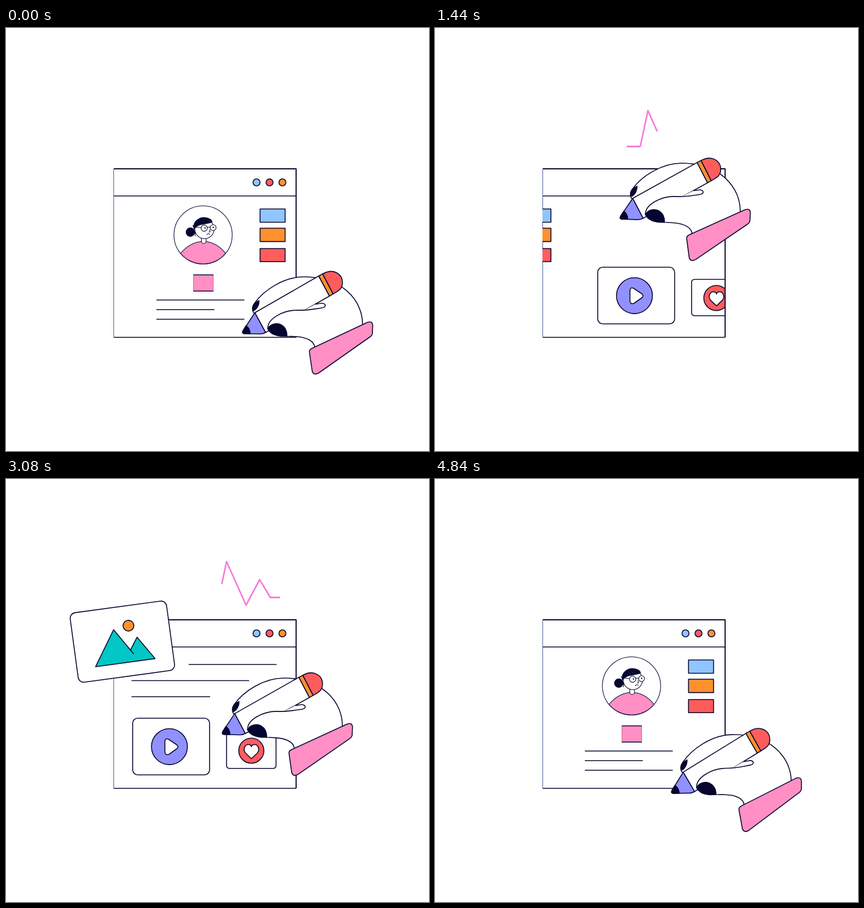
An HTML page for the animation above (4880 ms loop, 748 by 748 pixels).

```html
<!DOCTYPE html>
<html lang="en">
<head>
<meta charset="utf-8">
<title>Page design</title>
<style>
html, body { margin: 0; width: 100%; height: 100%; overflow: hidden; background: #fff; }
svg { display: block; width: 100%; height: 100%; }
.ink { stroke: #05052f; stroke-width: 1.6; fill: none; stroke-linejoin: round; }
.thin { stroke-width: 1.1; }
.bold { stroke-width: 1.9; }
.edge { stroke: #4b5694; stroke-width: 1; }
.bare { stroke: none; }
.white { fill: #fff; }
.pink { fill: #ff8fc4; }
.blue { fill: #90c5ff; }
.orange { fill: #ff912d; }
.red { fill: #ff5c5c; }
.purple { fill: #9190ff; }
.teal { fill: #03c6c6; }
.dark { fill: #05052f; }
.doodle { fill: none; stroke-width: 2.8; stroke-linejoin: round; }
</style>
</head>
<body>
<svg viewBox="0 0 748 748">
  <clipPath id="pane"><rect x="190" y="298" width="322" height="248.5"/></clipPath>

  <g class="ink">
    <path d="M190.5 297H513M190.5 547H513"/>
    <path class="bold" d="M190.5 249H513V547"/>
    <path class="edge" d="M190.5 249V547"/>
    <circle class="blue" cx="443" cy="273" r="6.2"/>
    <circle class="red" cx="466" cy="273" r="6.2"/>
    <circle class="orange" cx="488.8" cy="273" r="6.2"/>
  </g>

  <g clip-path="url(#pane)">
    <g id="board" class="ink">
      <path id="line0"/><path id="line1"/><path id="line2"/>
      <rect class="white" x="224" y="423" width="136" height="100.3" rx="9"/>
      <circle class="purple" cx="289" cy="473.3" r="31.8"/>
      <path class="white" d="M281 465q0-7 6-5L302 470q4 3.5 0 7L288 487q-7 2-7-5Z"/>
      <g id="like">
        <rect class="white" x="390" y="427" width="87.5" height="64.3" rx="5"/>
        <circle class="red" cx="433.8" cy="460" r="22.2"/>
        <path class="white" d="M434 474L423.5 464C418 457 423 449 428.5 449C431.5 449 434 451 434 453C434 451 436.5 449 439.5 449C445 449 450 457 444.5 464Z"/>
      </g>
    </g>
    <g id="profile" class="ink">
      <g class="thin">
        <circle class="white" cx="348.5" cy="366" r="51.5"/>
        <path class="pink" d="M308.7 398.5C321 384 335 377.5 349 377.5S377 384 388.3 398.5A51.5 51.5 0 0 1 308.7 398.5Z"/>
        <path class="white" d="M345.5 369V378.5Q349.5 384 353.8 378.5V369Z"/>
        <circle class="white" cx="351" cy="355.5" r="17"/>
        <circle class="dark" cx="326" cy="361" r="7.6"/>
        <path class="dark" d="M332.5 356C329 343 341 335 350 335C358 335 364 339 364.5 343C354 348 339 345 332.5 356Z"/>
        <circle class="white" cx="350.5" cy="354" r="5.6"/>
        <circle class="white" cx="366.3" cy="353" r="5.2"/>
        <path d="M356 353q2.5-2 5 0M345 353L335 352M360 356l1 4.5-2.5 .5M355 366q2.5-4 5.5-1M330 349l3 5M334.5 361v7"/>
        <circle class="dark bare" cx="352" cy="353.5" r="1.2"/>
        <circle class="dark bare" cx="366.5" cy="352.5" r="1.2"/>
      </g>
      <rect class="blue" x="449.3" y="320" width="44.3" height="23.5"/>
      <rect class="orange" x="449.3" y="354" width="44.3" height="23.6"/>
      <rect class="red" x="449.3" y="390" width="44.3" height="23.3"/>
      <rect id="button" class="pink" x="-86.3" y="436.5" width="172.6" height="28.7"/>
      <path d="M266 481H421.5M266 498H368.5M266 515H421.5"/>
    </g>
  </g>

  <g id="photo" class="ink">
    <rect class="white" x="-86" y="-62" width="172" height="124" rx="10"/>
    <path class="teal" d="M-53 37.7L-12.5-23L16.5 23.5L12.2 16.6L26.8-4.3L53.3 37.5Z"/>
    <circle class="orange" cx="14.4" cy="-26.5" r="9.5"/>
  </g>

  <path id="zigzag" class="doodle" stroke="#f67ddb" pathLength="100" d="M342 209.5H366L379.5 146L414 223L438 178L457 209.5H474"/>
  <path id="squiggle" class="doodle" stroke="#12aebf" pathLength="100" d="M112 541C120 556 134 556 141 554C149 552 155 546 150 540C145 536 134 541 135 551C137 567 154 580 170 576C180 573 185 568 181 564C175 560 164 567 166 578C170 598 195 602 210 590"/>

  <g id="hand" class="ink">
    <path class="white" d="M437 502C435 497 436 491 440 486C455 465 490 440 527 440C595 440 631 482 630.5 525L546 566C546 553 530 546.5 513 545.7L497 545L463 533Z"/>
    <path class="dark" d="M436.5 499C435 491 439 486 447.5 482C448 489 444 497 438 500Z"/>
    <path class="white" d="M440 503.5L553 438.5L572 474L459 538.5Z"/>
    <path class="purple" d="M440 503.5L459 538.5Q455 541 449 541L421 540.5Q417 540 419 535.5Z"/>
    <path class="dark" d="M424.5 526.5Q431 530 432 540.7L421 540.5Q417 540 419 535.5Z"/>
    <path class="orange" d="M553 438.5L560 434.8L578.5 470.3L572 474Z"/>
    <path class="red" d="M560 434.8C579 424 595 435 595 450C595 460 590 464 578.5 470.3Z"/>
    <path class="white bare" d="M463 533C461 514 490 499 515 499C532 499 545 497 558 495L570 530L497 545Z"/>
    <path class="white" d="M463 533C461 514 490 499 515 499C532 500 545 497 558 495Q565 494 564.5 490Q563 486 556 487L547 488.5"/>
    <path class="dark" d="M463 531.5C468 522 480 521 487 525C494 529 497 536 497 545L487 545C475 544 466 539 463 531.5Z"/>
    <path class="pink" d="M541 566.5L638 521Q648 517 648.5 526L648 539Q648 543 644 546L553 610Q544 615 541.5 607L536.5 573Q536 569 541 566.5Z"/>
  </g>
</svg>
<script>
const FRAMES = 122, FRAME_MS = 40;
const $ = id => document.getElementById(id);
const set = (id, name, value) => $(id).setAttribute(name, value);
const show = (id, on) => set(id, 'visibility', on ? 'visible' : 'hidden');
const clamp = v => Math.min(1, Math.max(0, v));
const linear = v => v;
const smooth = v => v * v * (3 - 2 * v);
const ramp = (f, from, to) => smooth(clamp((f - from) / (to - from)));

// Keys are [frame, value, ...]; returns the interpolated values.
function track(f, keys, ease = smooth) {
  const next = keys.findIndex(k => k[0] > f);
  if (next === 0) return keys[0].slice(1);
  if (next < 0) return keys[keys.length - 1].slice(1);
  const a = keys[next - 1], b = keys[next];
  const p = ease((f - a[0]) / (b[0] - a[0]));
  return a.slice(1).map((v, i) => v + (b[i + 1] - v) * p);
}

const DRAW = -29.5;
const handKeys = [
  [0, 418, 540, -29.9], [7, 424, 505, -24], [14, 447, 470, -9], [21, 433, 478, -11.3],
  [29, 416, 480, -19], [37, 323, 331, DRAW], [45, 478, 331, DRAW], [52, 222, 359, DRAW],
  [58, 430, 359, DRAW], [66, 224, 387.5, DRAW], [72, 361, 387.5, DRAW], [83, 410, 535, DRAW],
  [89, 426, 494.7, -21.8], [96, 418, 540, -29.9], [103, 420, 507.5, -25.4],
  [109, 428, 494, -21.8], [121, 418, 555.5, -31.7]
];
const buttonKeys = [[2, .205], [15, 1], [101, 1], [112, .205]];
const flipKeys = [[36, 0], [46, 1], [98, 1], [108, 0]];

// x start, x end, y, first frame, last frame
const lines = [[323, 478.5, 328, 37, 45], [222, 430, 356.5, 52, 58], [222, 361, 385, 66, 72]];

const zigzag = {
  starts: [1, 33, 65, 98], length: 22,
  end: [[0, 0], [1, 11], [5, 82], [7, 100]],
  start: [[10, 0], [14, 35], [16, 68], [20, 91.5], [22, 100]],
  shift: p => [1.5 * p - 7.5, 0]
};
const squiggle = {
  starts: [3, 24, 62, 98], length: 11,
  end: [[0, 0], [4, 100]],
  start: [[2, 0], [4, 13], [5, 25], [11, 100]],
  shift: p => [1.5 * p - 6.5, .7 * p - 2.4]
};

function drawDoodle(id, doodle, f) {
  const begin = doodle.starts.find(s => f > s && f < s + doodle.length);
  show(id, begin !== undefined);
  if (begin === undefined) return;
  const p = f - begin;
  const [a] = track(p, doodle.start, linear), [b] = track(p, doodle.end, linear);
  set(id, 'stroke-dasharray', `0 ${a} ${b - a} 200`);
  set(id, 'transform', `translate(${doodle.shift(p)})`);
}

function drawPages(f) {
  const leave = f < 29 ? 0 : -340 * (1 - Math.exp(-.27 * (f - 29)));
  const profileX = f < 99 ? leave : -131 * Math.exp(-.27 * (f - 103));
  set('profile', 'transform', `translate(${profileX})`);
  show('profile', f < 60 || f >= 99);
  set('button', 'transform', `translate(349) scale(${track(f, buttonKeys)[0]} 1)`);

  const boardX = 322 * Math.exp(-.27 * (f - 30)) + 322 * clamp((f - 104) / 8) ** 2;
  set('board', 'transform', `translate(${boardX})`);
  show('board', f >= 30 && f < 112);
  lines.forEach(([x1, x2, y, from, to], i) =>
    set('line' + i, 'd', `M${x1} ${y}H${x1 + (x2 - x1) * ramp(f, from, to)}`));
}

function draw(f) {
  drawPages(f);

  const bob = 12 * (1 - Math.cos(2 * Math.PI * (f - 49.5) / 20));
  set('like', 'transform', `translate(0 ${bob})`);
  const [flip] = track(f, flipKeys);
  show('photo', flip > 0);
  set('photo', 'transform',
    `translate(205.8 ${263 + 1.2 * bob}) rotate(${9.9 - .86 * bob}) scale(1 ${flip})`);

  drawDoodle('zigzag', zigzag, f);
  drawDoodle('squiggle', squiggle, f);

  const [x, y, angle] = track(f, handKeys);
  set('hand', 'transform', `translate(${x} ${y}) rotate(${angle + 29.9}) translate(-418 -540)`);
}

const origin = performance.now();
function tick() {
  const elapsed = Math.max(0, performance.now() - origin);
  draw(Math.floor(elapsed / FRAME_MS + .01) % FRAMES);
  requestAnimationFrame(tick);
}
tick();
</script>
</body>
</html>
```
